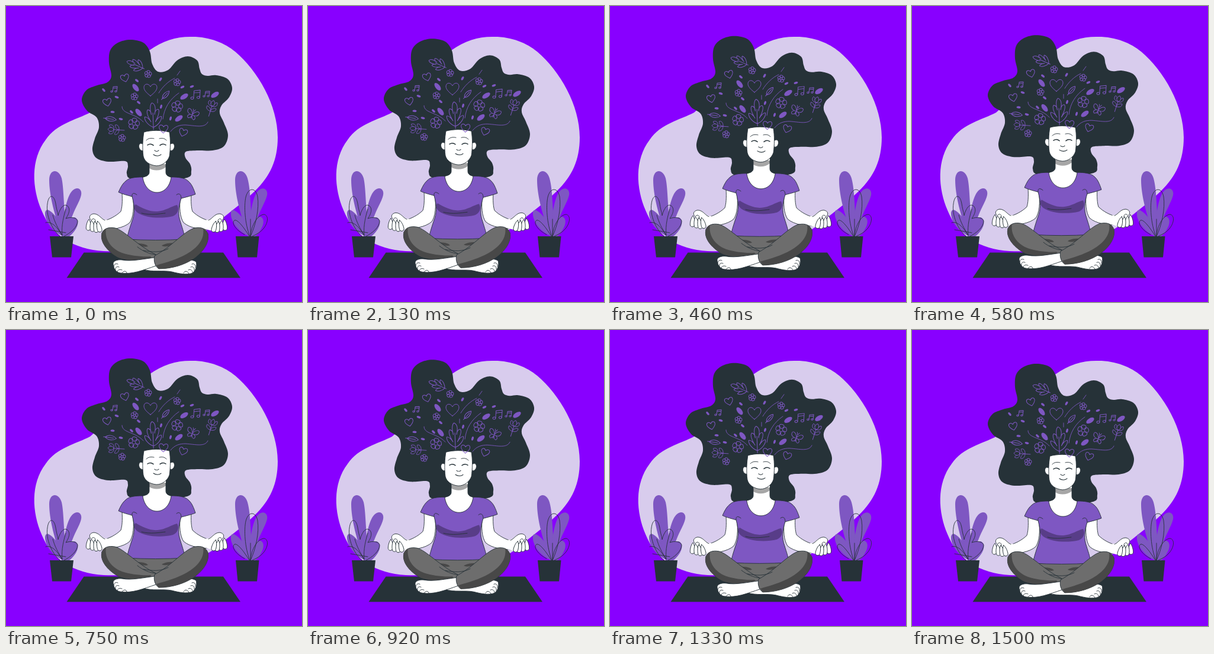
Animation, 500 px wide and 500 px high, one loop 1540 ms. Source, as an HTML page with a canvas:

```html
<!DOCTYPE html>
<html lang="en">
<head>
<meta charset="utf-8">
<title>Meditation</title>
<style>
html, body { margin: 0; width: 100%; height: 100%; overflow: hidden; background: #8800ff; }
canvas { display: block; width: 500px; height: 500px; }
</style>
</head>
<body>
<canvas id="stage" width="500" height="500"></canvas>
<script>
const ctx = document.getElementById('stage').getContext('2d');
const PURPLE = '#7e57c2', DARK = '#263238', PANTS = '#6d6d6d', SHADE = '#484848', SKIN = '#fff';
const LOOP = 1540, FPS = 24, HALF = 18, LIFT = 10, REST = 0.5;

function shape(d, fill, stroke, width = 0.9) {
  const path = d instanceof Path2D ? d : new Path2D(d);
  if (fill) { ctx.fillStyle = fill; ctx.fill(path); }
  if (stroke) { ctx.strokeStyle = stroke; ctx.lineWidth = width; ctx.stroke(path); }
}
const line = (d, color = DARK, width = 0.9) => shape(d, null, color, width);

function at(x, y, degrees, scale, draw) {
  ctx.save();
  ctx.translate(x, y);
  ctx.rotate(degrees * Math.PI / 180);
  ctx.scale(scale, scale);
  draw(1 / scale);
  ctx.restore();
}

function mirrored(draw) {
  draw();
  ctx.save();
  ctx.translate(509, 0);
  ctx.scale(-1, 1);
  draw();
  ctx.restore();
}

// Closed Catmull-Rom curve through [x, y] points.
function smooth(points) {
  const n = points.length, path = new Path2D();
  const p = i => points[(i + n) % n];
  path.moveTo(...p(0));
  for (let i = 0; i < n; i++) {
    const [a, b, c, d] = [p(i - 1), p(i), p(i + 1), p(i + 2)];
    path.bezierCurveTo(b[0] + (c[0] - a[0]) / 6, b[1] + (c[1] - a[1]) / 6,
      c[0] - (d[0] - b[0]) / 6, c[1] - (d[1] - b[1]) / 6, c[0], c[1]);
  }
  return path;
}

const hair = smooth([
  [210, 57], [232, 62], [243, 77], [247, 98], [257, 111], [274, 108], [289, 92], [307, 85],
  [323, 92], [327, 106], [331, 115], [341, 118], [355, 117], [374, 123], [382, 138], [377, 154],
  [364, 168], [361, 181], [368, 197], [375, 218], [368, 237], [349, 244], [325, 244], [304, 246],
  [303, 256], [311, 267], [313, 279], [306, 290], [255, 296], [212, 292], [204, 283], [206, 270],
  [201, 262], [173, 263], [153, 257], [146, 243], [150, 224], [157, 205], [153, 188], [137, 177],
  [128, 159], [136, 142], [154, 134], [171, 129], [178, 118], [174, 96], [176, 75], [189, 62]
]);

const blob = new Path2D('M311 52C342 51 369 62 387 77C426 110 459 168 459 222C459 260 446 288 420 313' +
  'C397 335 375 350 352 370C300 407 225 416 165 414C115 411 77 388 60 345C44 308 41 260 67 226' +
  'C85 199 119 192 142 180C185 145 200 100 242 75C264 59 287 52 311 52Z');

const lobedLeaf = 'M0 0C-8 -3 -16 -12 -15 -19C-11 -20 -6 -14 -4 -10C-9 -19 -13 -28 -9 -32C-5 -31 -3 -27 -3 -23' +
  'C-6 -35 -4 -42 -1 -44C4 -42 6 -35 3 -23C3 -27 6 -33 10 -32C13 -28 9 -19 4 -10C7 -15 12 -20 15 -19C16 -12 8 -3 0 0' +
  'M0 4V-26';

const heart = (x, y, size, turn = 0) => at(x, y, turn, size / 20, u =>
  line('M0 9C-8 3 -10 -1 -10 -4C-10 -10 -3 -11 0 -5C3 -11 10 -10 10 -4C10 -1 8 3 0 9Z', PURPLE, u));

const petal = (x, y, length, turn) => at(x, y, turn, 1, () => {
  const path = new Path2D();
  path.ellipse(0, 0, length / 2, length * 0.26, 0, 0, 7);
  shape(path, PURPLE);
});

const flower = (x, y, radius) => at(x, y, 10, radius / 10, u => {
  for (let i = 0; i < 5; i++) {
    line('M-2 -4C-6 -7 -4 -10 0 -10C4 -10 6 -7 2 -4', PURPLE, u);
    ctx.rotate(Math.PI * 0.4);
  }
  const core = new Path2D();
  core.arc(0, 0, 3, 0, 7);
  line(core, PURPLE, u);
});

const notes = (x, y, size, turn) => at(x, y, turn, size / 16, u => {
  line('M-4 6V-7L7 -9V4M-4 -3L7 -5', PURPLE, u);
  for (const [nx, ny] of [[-6.5, 6.5], [4.5, 4.5]]) {
    const head = new Path2D();
    head.ellipse(nx, ny, 2.6, 2, -0.3, 0, 7);
    line(head, PURPLE, u);
  }
});

const lobed = (x, y, turn, scale) => at(x, y, turn, scale, u => line(lobedLeaf, PURPLE, u));

const simpleLeaf = (x, y, turn, scale) => at(x, y, turn, scale, u =>
  line('M-10 0C-5 -6 4 -5 10 0C4 5 -5 5 -10 0ZM-13 0H5', PURPLE, u));

const tulip = (x, y, turn) => at(x, y, turn, 1, () =>
  line('M0 15V-3M0 -3C-5 -5 -4 -10 0 -13C4 -10 5 -5 0 -3M0 -3C-7 -2 -9 -7 -7 -11C-4 -11 -3 -8 -3 -7' +
    'M0 -3C7 -2 9 -7 7 -11C4 -11 3 -8 3 -7M0 6C-7 6 -9 2 -8 -1C-4 -1 0 2 0 6C7 6 9 2 8 -1C4 -1 0 2 0 6', PURPLE));

const butterfly = (x, y, turn) => at(x, y, turn, 1, () =>
  line('M0 -5V7M0 0C-4 -9 -11 -9 -10 -4C-10 0 -5 2 0 1C-7 1 -8 6 -5 8C-2 8 0 4 0 1' +
    'M0 0C4 -9 11 -9 10 -4C10 0 5 2 0 1C7 1 8 6 5 8C2 8 0 4 0 1M0 -5L-2 -9M0 -5L2 -9', PURPLE));

function thoughts() {
  lobed(231, 105, -66, 0.66);
  lobed(249, 205, -2, 0.94);
  heart(201, 122, 14, -15);
  heart(244, 142, 22);
  heart(171, 163, 14, -12);
  heart(299, 214, 14, 18);
  flower(240, 115, 6);
  flower(289, 129, 6);
  flower(217, 153, 6);
  flower(196, 223, 6);
  flower(289, 170, 9.5);
  flower(216, 199, 9.5);
  notes(183, 141, 10, 8);
  notes(321, 150, 15, 4);
  notes(339, 149, 10, 8);
  simpleLeaf(270, 150, -48, 0.85);
  simpleLeaf(177, 191, 8, 0.95);
  butterfly(315, 183, 22);
  tulip(347, 172, 18);
  tulip(185, 209, -86);
  for (const [x, y, turn] of [[219, 138, 52], [224, 180, 52], [301, 153, -32], [353, 150, -32], [292, 190, -36]])
    petal(x, y, 15, turn);
  for (const [x, y, turn] of [[221, 126, 40], [261, 124, -60], [165, 142, 50], [187, 154, 20], [180, 179, 5],
    [194, 191, 15], [212, 179, 45], [224, 163, 40], [298, 137, -25], [314, 136, -20], [262, 170, -75], [278, 190, -75]])
    petal(x, y, 7, turn);
  line('M196 170C196 183 219 181 232 196M256 164V157M258 147C264 137 274 127 285 122M289 117L294 110' +
    'M265 191C267 173 276 158 292 147M278 212C285 203 294 201 303 201C320 202 336 207 341 196', PURPLE);
}

function plants() {
  shape('M97 389C82 358 73 318 73 294C73 275 89 274 94 291C98 309 97 340 103 389Z', PURPLE);
  shape('M96 389C96 355 102 322 112 312C121 303 131 310 126 323C121 338 109 352 103 389Z', PURPLE);
  shape('M97 389C79 382 65 363 66 349C68 338 80 349 88 361C95 371 99 380 99 389Z', PURPLE);
  shape('M94 389C94 373 105 356 116 357C128 362 118 381 107 389Z', PURPLE);
  shape('M411 389C396 357 387 318 387 294C387 275 403 274 408 291C414 313 412 340 418 389Z', PURPLE);
  shape('M411 389C411 355 416 322 426 312C435 303 445 311 440 323C435 339 423 352 417 389Z', PURPLE);
  shape('M411 389C392 382 378 362 380 348C382 339 394 350 402 361C409 371 413 380 413 389Z', PURPLE);
  shape('M409 389C409 371 420 355 430 356C441 361 431 381 421 389Z', PURPLE);
  line('M91 389C77 377 67 353 70 334C72 318 81 317 84 334C86 347 88 350 88 354C91 342 97 334 103 337' +
    'C110 342 106 352 101 359C109 356 119 357 121 363C121 374 108 384 98 389M67 366C76 363 87 373 94 387' +
    'M95 387C88 376 82 365 79 353M95 387C93 370 98 354 101 343M72 378L101 383');
  line('M412 389C403 367 402 337 405 323C409 306 422 306 425 322C428 342 422 370 413 389M413 389V360' +
    'M413 389C414 370 425 353 436 352C444 354 443 366 435 376C430 382 423 386 416 389' +
    'M411 389C402 374 391 360 386 362C380 366 388 379 403 386');
  shape('M74 389H114L110 424.5H78Z', DARK);
  shape('M388 389H427.5L424 424.5H391.5Z', DARK);
}

function scenery() {
  ctx.fillStyle = '#8800ff';
  ctx.fillRect(0, 0, 500, 500);
  shape(blob, '#d8cced');
  shape('M131.5 416.5H367L396 459.3H102.5Z', DARK);
  plants();
}

function head() {
  shape('M242 260V281C242 287 234 289 229 290C232 306 243 317 255 317C267 317 278 306 281 290' +
    'C276 289 270 287 270 281V260Z', SKIN);
  shape('M242 267H270V272C262 279 249 279 242 274Z', '#a6a6a6');
  line('M242 268V281C242 286 237 288 231 289M270 268V281C270 286 274 288 279 289');
  mirrored(() => shape('M232 234C225 228 222 238 227 243C229 245 232 245 232 242Z', SKIN, DARK));
  shape('M233 213C246 209.5 261 209.5 276 213C278 225 278 241 276 254C273 263 264 270 254 270' +
    'C243 269 234 263 232 254C230 241 231 224 233 213Z', SKIN, DARK);
  line('M237 227C240 223 246 223 250 224M259 224C263 223 268 223 271 227');
  line('M239 235C242 233 246 233 249 235.5M260 235.5C263 233 267 233 270 235', DARK, 1.5);
  line('M251 244C253 246 256 246 258 244M249 251C253 254 259 254 262 251', DARK, 1.1);
}

function arm() {
  shape('M196 315C197 331 196 341 194 347C186 355 174 361 165 363L160 377C178 379 199 375 209 366' +
    'C215 357 217 341 214 320Z', SKIN, DARK);
  shape('M171 361C163 363 158 351 149 351C142 351 139 357 143 362L146 372L160 380L172 377Z', SKIN);
  line('M167 362C161 360 157 351 148 351C141 352 139 358 144 362');
  for (const [x, y, turn] of [[139.5, 370, 4], [145.5, 372, -6], [151.5, 373.5, -10], [157, 373, -14]])
    at(x, y, turn, 1, () =>
      shape('M0 -9.5C3 -7 4.5 3 3.6 6.5C2.5 10 -2.5 10 -3.6 6.5C-4.5 3 -3 -7 0 -9.5Z', SKIN, DARK));
  line('M145 361C148 357 152 361 151 365');
}

function shirt() {
  shape('M231 289C218 289 208 290 202 296C196 301 193 308 190 314.5C197 318 206 320 213 322C218 341 218 350 212 366' +
    'C208 378 205 387 203 400H303C302 386 298 376 295 366C290 352 291 340 296 325C304 323 312 321 320 318' +
    'C317 309 314 301 308 296C302 290 291 289 279 289C277 305 267 315 255 315C243 315 233 305 231 289Z', PURPLE, DARK);
  shape('M219 335C231 342 244 348 256 347C269 346 280 338 289 336C293 343 290 352 282 355' +
    'C262 360 235 358 222 349C216 344 215 338 219 335Z', '#583d88');
  line('M229 350C244 354 259 351 269 350M213 322C212 317 215 314 221 319M296 325C296 319 293 315 288 319');
}

function legs() {
  shape('M203 394Q253 397 302 394L286 412L254 431L216 412Z', PANTS, DARK);
  shape('M220 401C229 401 237 402 240 406C235 408 228 406 220 401ZM263 405C268 401 278 400 287 401C281 405 270 408 263 405Z', SHADE);
  // Leg reaching from the left knee, with its foot on the right.
  shape('M232 445C247 437 272 434 293 432C304 428 315 428 321 432C323 438 321 447 315 451C305 455 292 452 280 449C265 446 247 450 232 445Z', SKIN, DARK);
  line('M308 446C311 444 315 446 315 450M312 441C316 439 319 443 318 447M314 436C318 434 321 438 320 442M300 451C302 447 306 447 309 452');
  shape('M162 384C165 376 173 373 184 375C200 379 221 404 253 420L250 429C225 432 200 430 188 424C171 414 158 398 162 384Z', PANTS, DARK);
  shape('M169 376C166 393 177 410 196 417C211 422 230 424 244 423L249 429C225 432 200 430 188 424C171 414 158 398 162 384Q164 378 169 376Z', SHADE);
  // Leg reaching from the right knee, with its foot on the left.
  shape('M251 425C234 427 212 432 196 429C188 428 181 431 181 435C181 442 185 450 193 451C213 454 232 446 253 439Z', SKIN, DARK);
  line('M196 446C192 444 188 446 188 449M191 441C187 439 184 442 185 446M189 436C185 434 182 437 182 441M204 451C203 447 199 447 196 451');
  shape('M341 385C338 376 330 373 319 375C302 379 281 406 251 422C249 430 251 439 258 444C280 444 303 437 318 426C335 414 344 398 341 385Z', PANTS, DARK);
  shape('M333 376C336 394 323 409 305 419C289 428 271 433 254 438L258 444C280 444 303 437 318 426C335 414 344 398 341 385Q339 379 333 376Z', SHADE);
  line('M222 407C232 415 243 419 253 420M232 413C247 416 261 417 274 410');
}

function person() {
  shape(hair, DARK);
  head();
  thoughts();
  heart(266, 208, 15, 3);
  mirrored(arm);
  shirt();
  legs();
}

function render(now) {
  // The float runs in 24 fps steps: up for 18, down for 18, at constant speed.
  const step = (Math.floor((now % LOOP + 4) * FPS / 1000) + 1) % (2 * HALF);
  const rise = LIFT * (1 - Math.abs(step - HALF) / HALF);
  scenery();
  ctx.save();
  ctx.translate(0, REST - rise);
  person();
  ctx.restore();
}

ctx.lineCap = ctx.lineJoin = 'round';
const start = performance.now();
function tick() {
  render(performance.now() - start);
  requestAnimationFrame(tick);
}
tick();
</script>
</body>
</html>
```
